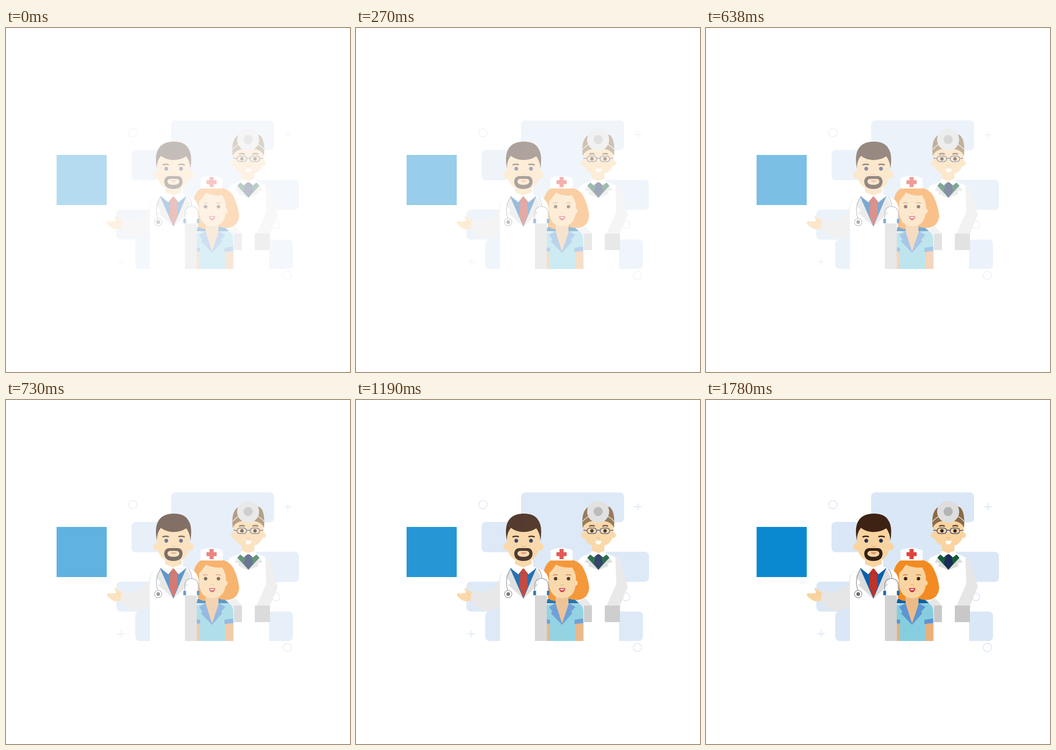
These frames come from a looping animation (748 px wide and 748 px high, 2.02 s). An HTML page:

```html
<!DOCTYPE html>
<html lang="en">
<head>
<meta charset="utf-8">
<title>Medical team</title>
<style>
  html, body { margin: 0; width: 100%; height: 100%; overflow: hidden; background: #fff; }
  svg { display: block; width: 100vw; height: 100vh; }
  .line { fill: none; stroke-linecap: round; stroke-linejoin: round; }
  .skin { fill: #f9d4a0; }
</style>
</head>
<body>
<svg viewBox="0 0 748 748">
  <g id="scene" opacity=".3">
    <rect x="110" y="276" width="109" height="109" fill="#0a89d0"/>

    <!-- backdrop -->
    <g fill="#dae7f6">
      <rect x="359" y="201" width="224" height="65" rx="9"/>
      <rect x="273" y="265" width="240" height="66" rx="9"/>
      <rect x="385" y="330" width="252" height="65.500" rx="9"/>
      <rect x="240" y="395" width="300" height="65" rx="9"/>
      <rect x="281" y="460" width="343" height="64" rx="9"/>
      <path d="M359 250H530V460H420V331H359ZM281 440H420V500H289V468Q289 460 281 460Z"/>
    </g>
    <g class="line" stroke="#dae7f6" stroke-width="1.800">
      <circle cx="276" cy="227.500" r="9"/>
      <circle cx="587" cy="428" r="8.500"/>
      <circle cx="612" cy="538" r="9"/>
      <path stroke-linecap="butt" d="M605 232H621M613 224V240M242.500 508.500H258.500M250.500 500.500V516.500"/>
    </g>

    <!-- doctor with head mirror -->
    <g>
      <path fill="#fff" d="M513 333Q498 337 488 343Q482 348 482 360L484 440H496V524H572V447L591 408L574 352Q571 345 560 340L541 333Z"/>
      <path fill="#e6e6e6" d="M564 343Q572 346 575 354L591 406L574 447H545L566 400ZM484 438L498 431L513 447H492Z"/>
      <path fill="#c8c8c8" d="M496 447H513V483H496ZM541 447H574V483H541Z"/>
      <path fill="#dcdcdc" d="M508 337L497 353L507 355L505 361L527 370L549 361L547 355L558 353L546 337L527 362Z"/>
      <path fill="#145c38" d="M511 334L503 343L527 369L551 343L543 334Z"/>
      <path fill="#1b2a5a" d="M523 334H532L534 342L537 355L527 369L517 355L521 342Z"/>
      <path class="skin" d="M513 305H540V329L527 336L513 329Z"/>
      <path fill="#fff" d="M513 328L508 335L517 342L527 334L537 342L546 335L540 328L527 333Z"/>
      <g class="skin">
        <ellipse cx="494" cy="294" rx="5" ry="6"/>
        <ellipse cx="560" cy="294" rx="5" ry="6"/>
        <path d="M494 255H560V288Q558 318 527 319Q496 318 494 288Z"/>
      </g>
      <path fill="#8b6b45" d="M493 278Q489 245 503 234Q526 224 552 233Q564 243 561 278Q555 262 527 262Q499 262 493 278Z"/>
      <path class="line" stroke="#e0e0e0" stroke-width="1.500" d="M493 264Q500 256 508 252M545 252Q555 256 561 264"/>
      <circle cx="526.500" cy="243" r="24" fill="#dedede"/>
      <circle cx="526.500" cy="242.500" r="10" fill="#b4b4b4"/>
      <path class="line" stroke="#644a35" stroke-width="3" stroke-linecap="butt" d="M508 274Q513 272 518 274M537 274Q542 272 547 274"/>
      <g fill="#3c2515">
        <circle cx="513" cy="284.500" r="3.700"/>
        <circle cx="541.500" cy="284.500" r="3.700"/>
      </g>
      <g class="line" stroke="#34436f" stroke-width="1.500">
        <rect x="502.500" y="278.500" width="20.500" height="12" rx="5.500"/>
        <rect x="531" y="278.500" width="20.500" height="12" rx="5.500"/>
        <path d="M523 284Q527 282 531 284M495 283L502 284M552 284L559 283"/>
      </g>
      <path class="line" stroke="#e3b07e" stroke-width="1.200" d="M523 299Q527 302 531 299"/>
      <path fill="#fff" d="M520.500 306H534Q533 314 527 314Q521.500 314 520.500 306Z"/>
    </g>

    <!-- nurse -->
    <g>
      <path fill="#0b62a4" d="M415 434L435 425H465L485 442H415Z"/>
      <path fill="#f38b22" d="M423 349Q411 357 408 375Q405 405 417 430Q424 438 437 437L440 420H460L462 432Q474 436 487 434Q505 430 507 408Q505 386 494 365Q484 347 455 345Z"/>
      <path fill="#e8b07c" d="M415 470H421V524H415ZM476 470H494V524H476Z"/>
      <path fill="#86cedf" d="M415 446L434 442H463L485 443Q494 447 494 460V486H477V524H420V486H415Z"/>
      <path fill="#5d94d2" d="M415 477L422 478V486H415ZM475 478L494 475V485L475 487Z"/>
      <path fill="#ecbb88" d="M434 420H462V444L448 488L434 444Z"/>
      <path fill="#5d94d2" d="M434 442L420 450L427 460L424 464L448 489L470 464L468 460L477 450L463 442L448 486Z"/>
      <g class="skin">
        <ellipse cx="477" cy="398" rx="5" ry="6"/>
        <path d="M420 377Q428 368 435 358Q450 366 470 364Q476 374 478 383V400Q475 431 449 431Q422 430 420 400Z"/>
      </g>
      <path fill="#fff" d="M423 327Q447 316 471 327V349H423Z"/>
      <path fill="#e0433f" d="M442.500 324H451.500V331H458V339.500H451.500V346H442.500V339.500H436V331H442.500Z"/>
      <path class="line" stroke="#c47a3d" stroke-width="1.800" d="M429 381Q433 379 438 380.500M457 380.500Q462 379 467 381"/>
      <g fill="#3c2418">
        <circle cx="434" cy="388.500" r="3.800"/>
        <circle cx="462" cy="388.500" r="3.800"/>
      </g>
      <path class="line" stroke="#e3ab78" stroke-width="1.200" d="M445 401Q448.500 404 452 401"/>
      <path fill="#cf2837" d="M441 410Q445 408 448 409.500Q451 408 455.500 410Q453 418 448 418Q443.500 418 441 410Z"/>
      <path fill="#fff" d="M443 411H453.500Q451 414 448 414Q445 414 443 411Z"/>
    </g>

    <!-- bearded doctor -->
    <g>
      <path class="skin" d="M254 417Q246 418 240 410Q236 407 236 411L240 419Q230 422 222 420Q217 422 221 427Q229 436 239 438L252 436Z"/>
      <path class="line" stroke="#e8b882" stroke-width="1" d="M240 419Q245 421 247 425"/>
      <path fill="#e6e6e6" d="M322 371Q313 377 311 393Q301 414 274 417Q262 417 254 413Q249 425 250 440Q269 456 286 459Q302 457 315 443L330 400Z"/>
      <path fill="#fff" d="M345 361L324 370Q314 376 313 395V524H390L415 440L419 416V392Q416 375 405 370L383 361Z"/>
      <path fill="#d2d2d2" d="M389 425H415V524H389Z"/>
      <path fill="#dcdcdc" d="M335 367L326 384L336 397L331 402L364 432L396 402L391 397L402 384L392 367L364 425Z"/>
      <path fill="#0c60ab" d="M335 366H392L364 432Z"/>
      <path fill="#bd3329" d="M358 366H370L372 375L373 407L364 431L355 407L357 375Z"/>
      <path class="line" stroke="#982a24" stroke-width=".9" d="M357 376H371"/>
      <path class="skin" d="M346 335H382V359L364 367L346 359Z"/>
      <path fill="#fff" d="M346 357L338 367L353 379L364 365L375 379L390 367L382 357L364 364Z"/>
      <g class="skin">
        <ellipse cx="327" cy="319" rx="7" ry="8"/>
        <ellipse cx="401" cy="319" rx="7" ry="8"/>
        <path d="M328 278H400V313Q398 351 364 352Q330 351 328 313Z"/>
      </g>
      <path fill="#3e2214" d="M328 306Q322 273 334 259Q344 247 365 247Q388 247 396 261Q406 274 401 306Q400 289 392 279Q378 288 361 287Q345 285 337 278Q328 288 328 306Z"/>
      <path fill="#352116" d="M344 334Q345 322 356 322H373Q383 322 384 334Q383 350 364 350Q345 350 344 334Z"/>
      <path class="skin" d="M351 335Q351 328 358 328H370Q377 328 377 335Q375 341 364 341Q353 341 351 335Z"/>
      <path fill="#e09973" d="M358 330.500H371Q369 335.500 364.500 335.500Q360 335.500 358 330.500Z"/>
      <path class="line" stroke="#e0aa76" stroke-width="1.300" d="M360 317Q364.500 321 369 317"/>
      <path class="line" stroke="#3e2214" stroke-width="3" stroke-linecap="butt" d="M341.500 297.500Q347 295.500 353 297M376 297Q382 295.500 387.500 297.500"/>
      <g fill="#23305e">
        <circle cx="348.500" cy="306" r="4.200"/>
        <circle cx="380.500" cy="306" r="4.200"/>
      </g>
      <g class="line" stroke="#8f989e" stroke-width="1.500">
        <path d="M336 368Q322 389 330 414M397 368Q404 377 404 388M388.500 416V403Q389 389 403 388Q418 389 418 403V416"/>
        <circle cx="331" cy="422" r="8" fill="#fff"/>
      </g>
      <circle cx="331" cy="422" r="4" fill="#6b6b6b"/>
      <path fill="#1668b0" d="M385.500 415H391.500V424.500H385.500ZM415 415H420.500V424.500H415Z"/>
    </g>
  </g>
</svg>
<script>
  const loop = 2020;
  const starts = [0, 270, 500, 730, 960, 1190, 1420];
  const alpha = i => 0.3 + 0.7 * i / (starts.length - 1);
  const steps = starts.map((t, i) => ({ offset: t / loop, opacity: alpha(i), easing: 'steps(1, end)' }));
  steps.push({ offset: 1, opacity: 1 });
  document.getElementById('scene').animate(steps, { duration: loop, iterations: Infinity });
</script>
</body>
</html>
```
